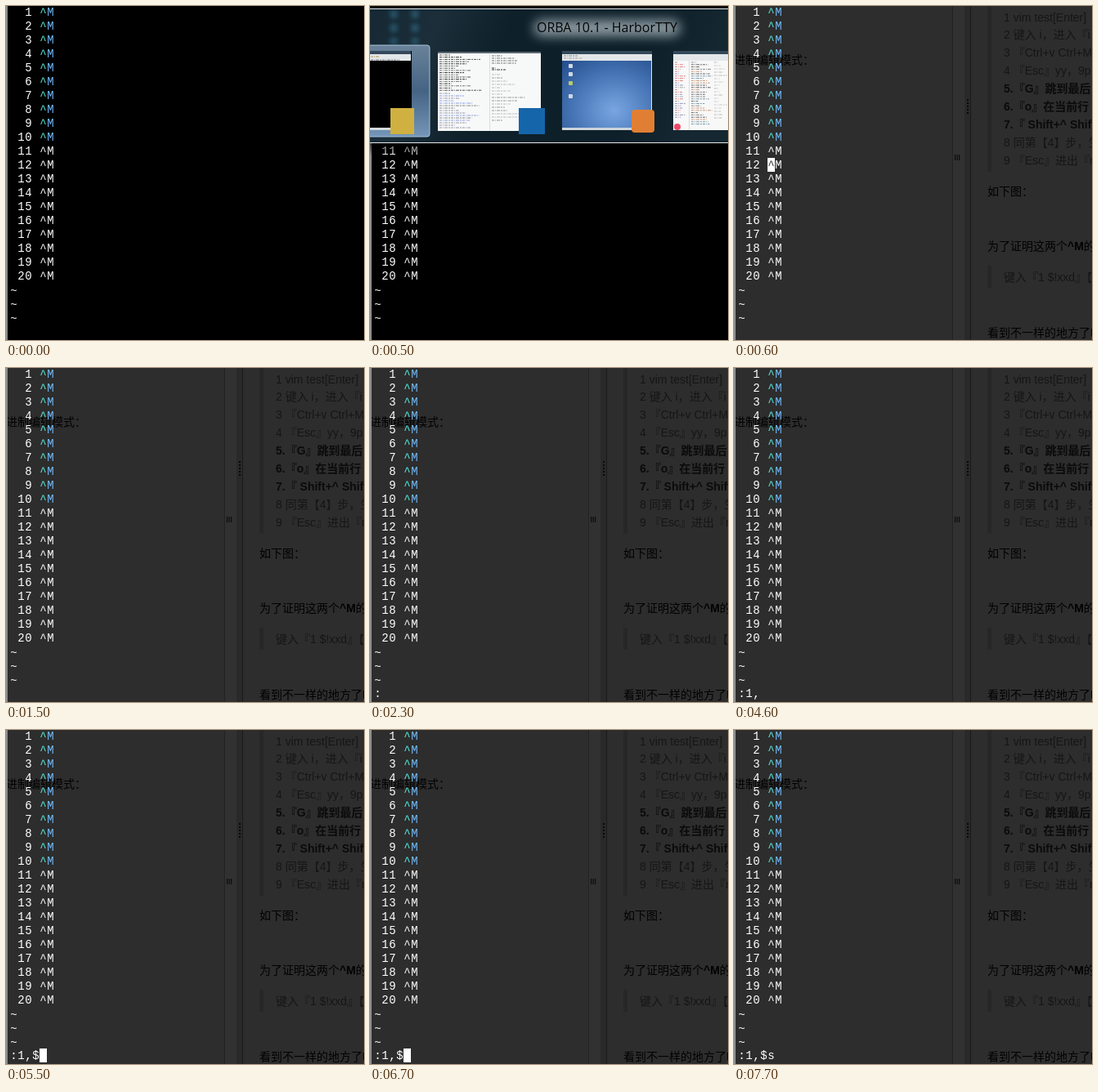
Write an HTML page that moves like this. It is 438 by 409 pixels and loops after 8 s.

```html
<!DOCTYPE html>
<html lang="zh">
<head>
<meta charset="utf-8">
<style>
html, body { margin: 0; width: 100%; height: 100%; overflow: hidden; background: #000; }
svg { display: block; }
text { white-space: pre; }
.term { font: 14px "Liberation Mono", monospace; letter-spacing: .6px; fill: #fff; }
.page { font: 14px "Liberation Sans", "Noto Sans CJK SC", "Noto Sans CJK", sans-serif; fill: #020202; }
.quote { fill: #161616; }
.bold { font-weight: 700; fill: #0b0b0b; }
.title { font: 16px "Open Sans", "Noto Sans", sans-serif; fill: #050505; }
</style>
</head>
<body>
<svg id="stage" width="438" height="409" viewBox="0 0 438 409">
  <defs>
    <linearGradient id="glass" x2="1" y2=".15">
      <stop offset="0" stop-color="#152833"/>
      <stop offset=".2" stop-color="#1b2e39"/>
      <stop offset=".4" stop-color="#0e202a"/>
      <stop offset=".8" stop-color="#0d1f29"/>
      <stop offset="1" stop-color="#152731"/>
    </linearGradient>
    <linearGradient id="tile" x2="0" y2="1">
      <stop offset="0" stop-color="#6a8299"/>
      <stop offset=".5" stop-color="#456484"/>
      <stop offset="1" stop-color="#7596b8"/>
    </linearGradient>
    <radialGradient id="desk" cx=".58" cy=".75" r=".85">
      <stop offset="0" stop-color="#79a6e2"/>
      <stop offset=".5" stop-color="#4a78b8"/>
      <stop offset="1" stop-color="#234c8c"/>
    </radialGradient>
    <linearGradient id="shade" x2="0" y2="1">
      <stop offset="0" stop-color="#000" stop-opacity=".6"/>
      <stop offset="1" stop-color="#000" stop-opacity="0"/>
    </linearGradient>
    <filter id="glow" x="-30%" y="-100%" width="160%" height="300%"><feGaussianBlur stdDeviation="7"/></filter>
    <filter id="soft" filterUnits="userSpaceOnUse" x="0" y="0" width="90" height="60"><feGaussianBlur stdDeviation="2.5"/></filter>
  </defs>
  <g id="page"></g>
  <g id="term"></g>
  <g id="switcher"></g>
</svg>
<script>
const LOOP = 8000, CELL = 9, ROW = 17;
const $ = id => document.getElementById(id);
const colX = c => 5 + c * CELL;
const rowY = r => r * ROW - 1;

function add(parent, tag, attrs, text) {
  const el = document.createElementNS("http://www.w3.org/2000/svg", tag);
  for (const k in attrs) el.setAttribute(k, attrs[k]);
  if (text !== undefined) el.textContent = text;
  parent.appendChild(el);
  return el;
}
const rect = (g, x, y, width, height, fill, more) =>
  add(g, "rect", { x, y, width, height, fill, ...more });
const label = (g, x, y, cls, text, more) =>
  add(g, "text", { x, y, class: cls, ...more }, text);
const cells = (g, col, row, text, more) =>
  label(g, colX(col) + 0.3, rowY(row) + 13, "term", text, more);

function rng(seed) {
  return () => (seed = (seed * 16807) % 2147483647) / 2147483647;
}

// Web page showing through the translucent terminal
function drawPage(g) {
  rect(g, 0, 0, 438, 409, "#2d2d2d");
  rect(g, 267, 0, 15, 409, "#313131");
  rect(g, 267, 0, 1, 409, "#222");
  rect(g, 282, 0, 8, 409, "#292929");
  rect(g, 289, 0, 1, 409, "#1a1a1a");
  for (let i = 0; i < 3; i++) rect(g, 270 + i * 2.5, 182, 1.2, 7, "#0c0c0c");
  for (let i = 0; i < 5; i++) rect(g, 285, 114 + i * 4, 2, 2, "#080808");
  rect(g, 310, 0, 5, 203, "#272727");
  rect(g, 310, 318, 5, 27, "#272727");
  [
    "1 vim test[Enter]", "2 键入 i，进入『i", "3 『Ctrl+v Ctrl+M", "4 『Esc』yy，9p，",
    "5.『G』跳到最后", "6.『o』在当前行", "7.『 Shift+^ Shift", "8 同第【4】步，生", "9 『Esc』进出『r"
  ].forEach((s, i) =>
    label(g, 330, 18.5 + i * 21.9, i > 3 && i < 7 ? "page bold" : "page quote", s));
  label(g, 0, 71, "page", "进制编辑模式：");
  label(g, 310, 232, "page", "如下图：");
  const proof = label(g, 310, 299, "page", "为了证明这两个");
  add(proof, "tspan", { "font-weight": 700 }, "^M");
  add(proof, "tspan", {}, "的");
  label(g, 330, 337, "page quote", "键入『1 $!xxd』【");
  label(g, 310, 405, "page", "看到不一样的地方了吗");
}

function drawTerm(g) {
  rect(g, 0, 0, 2, 409, "#8c8c8c");
  for (let n = 1; n <= 20; n++) {
    cells(g, 0, n - 1, String(n).padStart(3));
    const special = n <= 10;
    cells(g, 4, n - 1, "^", special ? { style: "fill:#58eee0" } : {});
    cells(g, 5, n - 1, "M", special ? { style: "fill:#72bcff" } : {});
  }
  for (let r = 20; r < 23; r++) cells(g, 0, r, "~", { dy: 1 });
}

// Rows of short dashes that read as tiny text
function scribble(g, x, y, width, rows, step, seed, colors) {
  const rand = rng(seed);
  for (let i = 0; i < rows; i++) {
    const w = width * (0.25 + 0.75 * rand());
    add(g, "path", {
      d: `M${x} ${(y + i * step).toFixed(1)}h${w.toFixed(1)}`,
      stroke: colors[Math.floor(rand() * colors.length)],
      "stroke-width": 1, "stroke-dasharray": "3 1 1 1 4 1 2 1"
    });
  }
}

// Window frame of a thumbnail: dark glass caption above a pale toolbar
function caption(g, x, width) {
  rect(g, x, 55, width, 4, "#34495a");
  rect(g, x, 59, width, 8, "#e3e7ea");
}

function drawSwitcher(g) {
  rect(g, 0, 168, 438, 16, "url(#shade)");
  rect(g, 0, 0, 438, 168, "#050505");
  rect(g, 0, 4, 438, 163, "url(#glass)");
  for (const x of [29, 55])
    add(g, "path", {
      d: `M${x} 5v42`, stroke: "#2f6078", "stroke-width": 9,
      "stroke-dasharray": "10 7", filter: "url(#soft)", opacity: .7
    });
  rect(g, 0, 3, 438, 1, "#e6eaec");
  rect(g, 0, 167, 438, 1, "#e6eaec");
  rect(g, 200, 17, 180, 20, "#a3b0b7", { filter: "url(#glow)", opacity: .85, rx: 10 });
  label(g, 290, 32, "title", "ORBA 10.1 - HarborTTY", { "text-anchor": "middle" });

  rect(g, -8, 48, 81, 112, "url(#tile)", { rx: 3, stroke: "#a5c2da" });
  rect(g, -4, 55, 55, 97, "#000");
  caption(g, 0, 50);
  scribble(g, 1, 62, 42, 2, 4, 5, ["#777", "#b59a48"]);
  rect(g, 0, 149, 50, 3, "#d5dade");
  rect(g, 25, 125, 29, 32, "#d0b040");

  rect(g, 83, 56, 126, 97, "#f7f8f8");
  rect(g, 83, 56, 126, 2, "#5a6872");
  scribble(g, 85, 60, 56, 17, 2.7, 11, ["#333", "#555", "#777"]);
  scribble(g, 85, 107, 56, 15, 3, 23, ["#99a", "#8aa0e0", "#888"]);
  rect(g, 146, 59, 1, 93, "#ddd");
  scribble(g, 149, 61, 50, 4, 3, 31, ["#777"]);
  scribble(g, 149, 76, 18, 2, 2, 41, ["#333"]);
  scribble(g, 149, 84, 46, 15, 4, 53, ["#999", "#bbb"]);
  rect(g, 182, 125, 32, 32, "#1565ab");

  rect(g, 235, 55, 110, 97, "url(#desk)");
  caption(g, 235, 110);
  scribble(g, 237, 61, 70, 2, 3, 61, ["#888", "#a98"]);
  for (const y of [73, 83, 94, 110])
    rect(g, 243, y - 2, 5, 5, y === 94 ? "#b8c870" : "#cfd9e6", { rx: 1 });
  rect(g, 344, 67, 1, 85, "#dfe5ea");
  rect(g, 235, 149, 110, 3, "#cdd4da");
  rect(g, 320, 127, 28, 28, "#e07f33", { rx: 4 });

  rect(g, 371, 55, 67, 97, "#f8f8f8");
  caption(g, 371, 67);
  scribble(g, 373, 69, 14, 25, 2.8, 71, ["#aaa", "#d88", "#99b"]);
  rect(g, 390, 67, 1, 85, "#ddd");
  scribble(g, 393, 69, 26, 28, 2.8, 83, ["#666", "#888", "#c97", "#79a"]);
  scribble(g, 421, 69, 17, 18, 4, 97, ["#ccc", "#bbb"]);
  add(g, "circle", { cx: 376, cy: 148, r: 4, fill: "#ee4968" });
}

drawPage($("page"));
drawTerm($("term"));
drawSwitcher($("switcher"));
const command = cells($("term"), 0, 23, "");
const caret = rect($("term"), 0, 0, CELL, ROW, "#fff");
const under = cells($("term"), 4, 11, "^", { style: "fill:#2d2d2d" });

// [start, command line, caret shown]
const steps = [
  [0, "", 0], [600, "", 1], [1500, "", 0],
  [1600, ":", 1], [2300, ":", 0], [2700, ":", 1],
  [3000, ":1", 1], [3100, ":1", 0],
  [3500, ":1,", 1], [3900, ":1,", 0], [4300, ":1,", 1], [4600, ":1,", 0], [5000, ":1,", 1], [5400, ":1,", 0],
  [5500, ":1,$", 1], [6300, ":1,$", 0], [6700, ":1,$", 1], [7100, ":1,$", 0], [7400, ":1,$", 1],
  [7600, ":1,$s", 1], [7700, ":1,$s", 0]
];
const show = (el, on) => el.setAttribute("visibility", on ? "visible" : "hidden");

function render(t) {
  const [, text, blink] = steps.filter(s => s[0] <= t).pop();
  show($("page"), t >= 600);
  show($("switcher"), t >= 500 && t < 600);
  command.textContent = text;
  caret.setAttribute("x", colX(text ? text.length : 4));
  caret.setAttribute("y", rowY(text ? 23 : 11));
  show(caret, blink);
  show(under, blink && !text);
}

const begin = performance.now();
function tick() {
  render((performance.now() - begin) % LOOP);
  requestAnimationFrame(tick);
}
tick();
</script>
</body>
</html>
```
